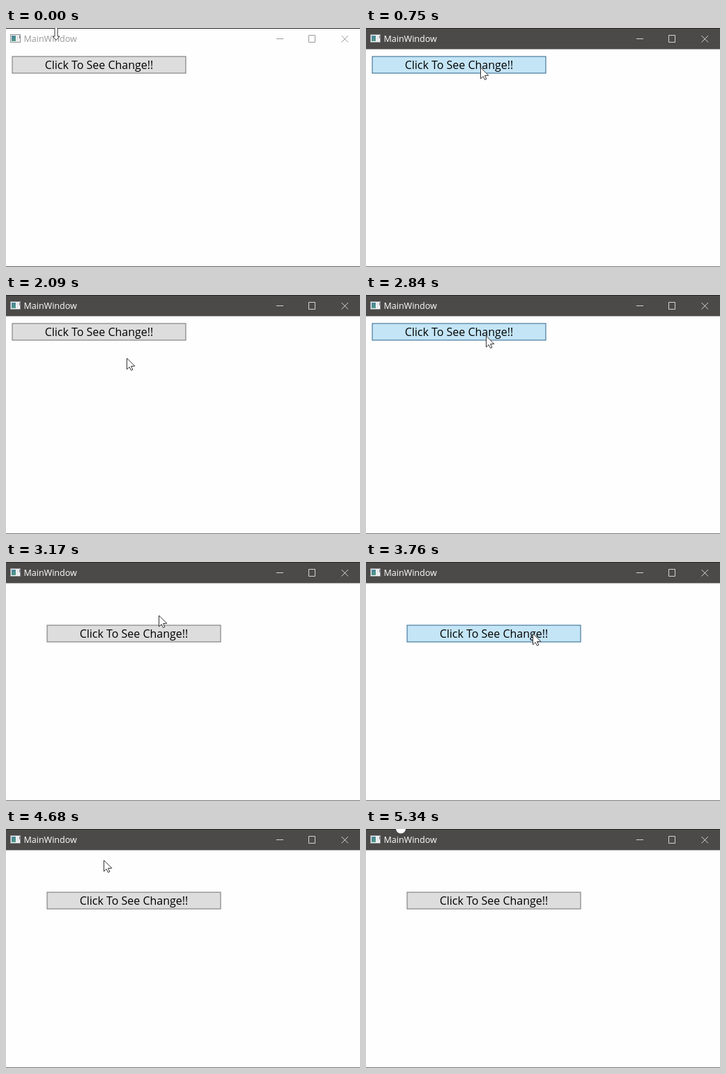
These frames come from a looping animation (508 by 344 pixels, 6.01 s). An HTML page with a canvas:

```html
<!DOCTYPE html>
<html lang="en">
<head>
<meta charset="utf-8">
<title>MainWindow</title>
<style>
  html, body { margin: 0; width: 100%; height: 100%; overflow: hidden; background: #fefefe; }
  canvas { display: block; }
</style>
</head>
<body>
<canvas id="stage" width="508" height="344"></canvas>
<script>
const ctx = document.getElementById('stage').getContext('2d');
const LOOP = 6010, STEP = 83.44;
const FONT = '"Open Sans", "Noto Sans", sans-serif';
const HOME = { x: 8.5, y: 40.5 }, SHIFT = 50;
const BUTTON_W = 250, BUTTON_H = 25;

// Pointer visits, counted in steps: travel to the spot, then press and hold.
const ENTRY = { x: 84, y: 0 };
const VISITS = [
  { arrive: 5, travel: 5, x: 165, y: 57, press: 9, hold: 1 },
  { arrive: 19, travel: 7, x: 225, y: 107, press: 21, hold: 1 },
  { arrive: 31, travel: 9, x: 173, y: 59, press: 34, hold: 2, bend: 10 },
  { arrive: 41, travel: 5, x: 240, y: 103, press: 45, hold: 1 },
  { arrive: 52, travel: 6, x: 141, y: 45, press: 54, hold: 2 },
  { arrive: 63, travel: 7, x: 48, y: -7 }
];
const EXIT = VISITS[VISITS.length - 1].arrive;

const COLORS = {
  normal: ['#dddddd', '#707070'],
  hover: ['#bee6fd', '#3c7fb1'],
  pressed: ['#c4e5f6', '#2c628b']
};

// The screen refreshes about twelve times a second, on a 10 ms grid.
const stepAt = t => Math.floor((10 * Math.floor(t / 10) + 2.29) / STEP);

// Steady vertical motion; the horizontal part eases out, which bends the path.
function pointerAt(k) {
  let { x, y } = ENTRY;
  for (const v of VISITS) {
    const p = Math.min(1, Math.max(0, 1 - (v.arrive - k) / v.travel));
    x += (v.x - x) * (1 - (1 - p) ** (v.bend || 2.4));
    y += (v.y - y) * p;
  }
  return [Math.round(x), Math.round(y)];
}

function rect(x, y, w, h, color) {
  ctx.fillStyle = color;
  ctx.fillRect(x, y, w, h);
}

function shape(points, dx, dy) {
  ctx.beginPath();
  points.forEach(([x, y]) => ctx.lineTo(dx + x, dy + y));
  ctx.closePath();
  ctx.fillStyle = '#fff';
  ctx.fill();
  ctx.strokeStyle = '#333';
  ctx.lineWidth = 1;
  ctx.stroke();
}

function label(str, x, y, size, color, align) {
  ctx.font = `${size}px ${FONT}`;
  ctx.textAlign = align;
  ctx.fillStyle = color;
  ctx.fillText(str, x, y);
}

function drawIcon() {
  rect(6, 9, 15, 12, '#8c9196');
  rect(7, 10, 13, 10, '#f6f6f6');
  const g = ctx.createLinearGradient(8, 11, 14, 19);
  g.addColorStop(0, '#4b7f9e');
  g.addColorStop(1, '#4f9c83');
  rect(8, 11, 6, 8, g);
  rect(15, 11, 3, 8, '#e4e7e9');
  rect(19, 11, 1, 4, '#7d8488');
}

function drawControls(color) {
  const r = 4.75, cy = 15.75, cx = 486.25;
  ctx.strokeStyle = color;
  ctx.lineWidth = 1;
  ctx.beginPath();
  ctx.moveTo(388, 15.5);
  ctx.lineTo(398, 15.5);
  ctx.rect(434.5, 10.5, 9, 10);
  for (const s of [-1, 1]) {
    ctx.moveTo(cx - r, cy - s * r);
    ctx.lineTo(cx + r, cy + s * r);
  }
  ctx.stroke();
}

function drawWindow(active) {
  rect(0, 0, 508, 344, '#fefefe');
  if (active) rect(0, 0, 508, 30.5, '#4c4a48');
  rect(0, 0, 508, 1, '#252525');
  rect(0, 343, 508, 1, active ? '#777' : '#606060');
  drawIcon();
  label('MainWindow', 25.5, 20, 12.5, active ? '#fff' : '#999', 'left');
  drawControls(active ? '#d4d4d4' : '#999');
}

function drawButton(x, y, state) {
  const [fill, border] = COLORS[state];
  rect(x, y, BUTTON_W, BUTTON_H, border);
  rect(x + 1, y + 1, BUTTON_W - 2, BUTTON_H - 2, fill);
  label('Click To See Change!!', x + BUTTON_W / 2, y + 18.5, 16, '#000', 'center');
}

function drawPointer(k) {
  if (k === 0) {
    shape([[-2, -3], [-2, 12], [-5, 12], [0, 17.5], [5, 12], [2, 12], [2, -3]], 72, 0);
  } else if (k <= EXIT) {
    const [x, y] = pointerAt(k);
    shape([[0, 0], [0, 16], [3.6, 12.6], [6.1, 17.5], [8.4, 16.4], [6, 11.6], [11.3, 11.3]], x - 0.5, y);
  } else {
    // Lower edge of the pointer as it leaves the window
    ctx.beginPath();
    ctx.ellipse(50, 0, 7, 6.5, 0, 0, Math.PI);
    ctx.fillStyle = '#fff';
    ctx.fill();
  }
}

function draw(t) {
  const k = stepAt(t);
  const [px, py] = pointerAt(k);
  const clicks = VISITS.filter(v => k >= v.press + v.hold).length;
  const down = VISITS.some(v => k >= v.press && k < v.press + v.hold);
  const shift = clicks % 2 * SHIFT;
  const dx = px - HOME.x - shift, dy = py - HOME.y - shift;
  const over = dx >= 0 && dx < BUTTON_W && dy >= 0 && dy < BUTTON_H;

  drawWindow(k >= VISITS[0].press);
  drawButton(HOME.x + shift, HOME.y + shift, down ? 'pressed' : over ? 'hover' : 'normal');
  drawPointer(k);
}

const start = performance.now();
function tick() {
  draw((performance.now() - start) % LOOP);
  requestAnimationFrame(tick);
}
tick();
</script>
</body>
</html>
```
